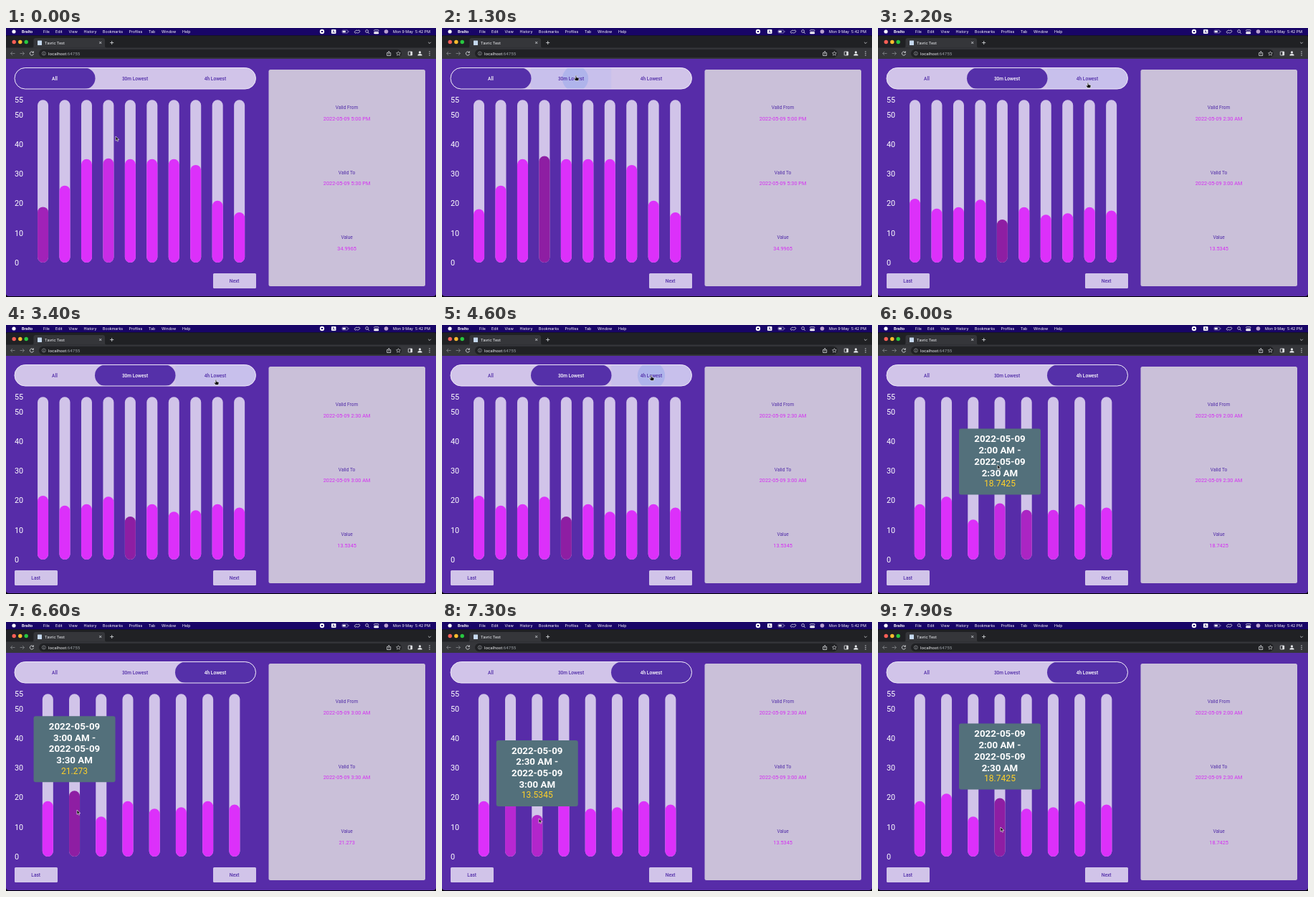
An HTML page that plays this animation: 600x375 px, repeating every 8000 ms.

```html
<!DOCTYPE html>
<html lang="en">
<head>
<meta charset="utf-8">
<title>Price chart</title>
<style>
  html, body { margin: 0; width: 100%; height: 100%; overflow: hidden; background: #000; }
  svg { display: block; width: 100vw; height: 100vh; }
  text { white-space: pre; }
  .menu { font: 5.3px Inter, sans-serif; fill: #fff; }
  .app { font-weight: 700; }
  .browser { font: 5.8px Roboto, sans-serif; fill: #e8eaed; }
  .line { fill: none; stroke: #dfe1e5; stroke-width: .8; }
  .axis { font: 10.8px Roboto, sans-serif; fill: #fff; }
  .tab, .button { font: 500 6.6px Roboto, sans-serif; fill: #512da8; text-anchor: middle; }
  .tab.on { fill: #fff; }
  .label { font: 6.6px Roboto, sans-serif; fill: #512da8; text-anchor: middle; }
  .value { font: 7.3px Roboto, sans-serif; fill: #d52df2; text-anchor: middle; }
  .tip { font: 700 13.3px Roboto, sans-serif; fill: #fff; text-anchor: middle; }
  .tip.price { font: 12.1px Roboto, sans-serif; fill: #ffd02a; }
</style>
</head>
<body>
<svg id="stage" viewBox="0 0 600 375" preserveAspectRatio="none">
  <defs>
    <clipPath id="pill"><rect x="12" y="55.5" width="336.5" height="29.5" rx="14.75"/></clipPath>
  </defs>
  <g id="shell"></g>
  <g id="live"></g>
</svg>
<script>
const LOOP = 8000, SWAP = 150;
const BASE = 327, TOP = 100.3, UNIT = 4.122;
const LEFT = 28.6, SPAN = 320, BAR = 15;
const PALE = '#d1c4e9', PURPLE = '#572ca8';
const PLAIN = [220, 48, 250], PICKED = [142, 30, 163];

const night = [21.588, 18.27, 18.7425, 21.273, 13.5345, 18.7425, 16.17, 16.695, 18.7425, 17.598];
const SETS = [
  { values: [18.06, 26.04, ...Array(5).fill(34.9965), 33.012, 20.937, 16.989], start: 1110 },
  { values: night, start: 270 },
  { values: night.slice(2), start: 210 }
];
const SWITCH = [[1400, 1, 4], [4700, 2, 0]];
const RIPPLES = [[1200, 186, 70.5], [4490, 292, 70.5]];

// time, x, y of the pointer tip
const PATH = [
  [0, 153, 151], [300, 153, 150], [700, 156, 96], [1100, 187, 66], [1600, 187, 66],
  [2050, 293, 76], [4200, 293, 76], [4450, 292, 70], [5400, 292, 70],
  [6400, 99, 262], [6900, 99, 262], [7700, 171, 286], [8000, 171, 286]
];

const mix = (a, b, p) => a + (b - a) * p;
const clamp = v => Math.max(0, Math.min(1, v));
const ease = p => p * p * (3 - 2 * p);
const rect = (x, y, w, h, fill, r = 0, extra = '') =>
  `<rect x="${x}" y="${y}" width="${w}" height="${h}" rx="${r}" fill="${fill}" ${extra}/>`;
const dot = (x, y, r, fill, extra = '') => `<circle cx="${x}" cy="${y}" r="${r}" fill="${fill}" ${extra}/>`;
const text = (cls, x, y, s) => `<text class="${cls}" x="${x}" y="${y}">${s}</text>`;
const line = (d, extra = '') => `<path class="line" d="${d}" ${extra}/>`;

function pointer(t) {
  const i = Math.max(1, PATH.findIndex(k => k[0] > t));
  const [a, b] = [PATH[i - 1], PATH[i]];
  const p = ease((t - a[0]) / (b[0] - a[0]));
  return [mix(a[1], b[1], p), mix(a[2], b[2], p)];
}

function centre(set, i) {
  const n = SETS[set].values.length;
  const gap = (SPAN - n * BAR) / (n + 1);
  return LEFT + gap + BAR / 2 + i * (gap + BAR);
}

function barUnder(set, [x, y]) {
  if (y < TOP || y > BASE) return -1;
  return SETS[set].values.findIndex((v, i) => Math.abs(x - centre(set, i)) < 9);
}

const setAt = t => SWITCH.reduce((s, [at, set]) => t >= at ? set : s, 0);

// Every change of selection, found by following the pointer
const events = [{ t: -1000, set: 0, pick: 0 }, { t: -35, set: 0, pick: 3 }];
for (let t = 0; t < LOOP; t += 10) {
  const set = setAt(t), last = events[events.length - 1];
  const hit = barUnder(set, pointer(t));
  const change = SWITCH.find(s => s[0] === t);
  if (change) events.push({ t, set, pick: change[2] });
  else if (hit >= 0 && hit !== last.pick) events.push({ t, set, pick: hit });
}

// Each bar as value and highlight, blended from the pose before it
function pose(k, t) {
  const { set, pick, t: at } = events[k];
  const goal = SETS[set].values.map((v, i) => ({ v: v + (i === pick), h: +(i === pick) }));
  const p = clamp((t - at) / SWAP);
  if (!k || p === 1) return goal;
  const from = pose(k - 1, at);
  return goal.map((g, i) => ({ v: mix(from[i].v, g.v, p), h: mix(from[i].h, g.h, p) }));
}

function clock(m) {
  const h = Math.floor(m / 60);
  return `${h % 12 || 12}:${String(m % 60).padStart(2, '0')} ${h < 12 ? 'AM' : 'PM'}`;
}

function drawShell() {
  const menu = [['Bralto', 22], ['File', 52], ['Edit', 69], ['View', 87.5], ['History', 108.5],
    ['Bookmarks', 135], ['Profiles', 171.5], ['Tab', 199], ['Window', 217], ['Help', 246]];
  const axis = [0, 10, 20, 30, 40, 50, 55];
  const grey = 'style="stroke:#85878b"';
  return [
    rect(0, 0, 600, 10.5, '#180567'),
    dot(11, 5, 2.6, '#fff'),
    ...menu.map(([s, x], i) => text(i ? 'menu' : 'menu app', x, 7, s)),
    dot(441, 5, 3.2, '#fff'), rect(439.9, 3.9, 2.2, 2.2, '#180567', .3),
    rect(454, 2, 6.5, 6, '#fff', 1), '<text x="455.5" y="7" font-family="Inter, sans-serif" font-size="5" fill="#180567">A</text>',
    rect(469, 3, 8, 4, 'none', 1, 'stroke="#aaa2d0" stroke-width=".6"'), rect(469.8, 3.8, 4, 2.4, '#fff', .4),
    rect(477.6, 4.2, .8, 1.6, '#aaa2d0'),
    line('M489 6.5l-1 .6a1.5 1.5 0 0 1-1.2-2.6l2-1.2a1.5 1.5 0 0 1 2 .7M491 3.6l1-.5a1.5 1.5 0 0 1 1.3 2.6l-2 1.2a1.5 1.5 0 0 1-2-.7'),
    dot(503.6, 4.5, 1.9, 'none', 'stroke="#fff" stroke-width=".7"'), line('M505 6l1.8 1.8'),
    rect(513.5, 2.5, 6.5, 2.2, 'none', 1.1, 'stroke="#fff" stroke-width=".6"'), rect(513.2, 5.6, 7, 2.6, '#fff', 1.3),
    dot(530.5, 5, 2.8, '#b9a0cf'),
    text('menu', 540, 7, 'Mon 9 May  5:42 PM'),

    rect(0, 10.5, 600, 20, '#202124', 2),
    dot(11.2, 19.5, 2.7, '#ff5f57'), dot(19.8, 19.5, 2.7, '#febc2e'), dot(28.2, 19.5, 2.7, '#28c840'),
    '<path d="M36 27.5q2.5 0 2.5-2.5v-8q0-3 3-3h93.500q3 0 3 3v8q0 2.500 2.500 2.500z" fill="#35363a"/>',
    rect(44, 17.5, 6, 6.5, '#c5d8ee', .5),
    text('browser', 54, 22.7, 'Tavric Test'),
    line('M130.200 19l3 3m0-3l-3 3'), line('M145.200 20.500h5M147.700 18v5'),
    line('M589.200 19.800l1.800 1.800l1.800-1.800'),
    rect(0, 27.5, 600, 15.5, '#35363a'),
    line('M12.500 35.500h-6m2.500-2.500l-2.500 2.500l2.500 2.500', grey), line('M19.500 35.500h6m-2.500-2.500l2.500 2.500l-2.500 2.500', grey),
    line('M38 33.900a2.600 2.600 0 1 0 .5 2.200M38.400 32.400v2h-2'),
    rect(46, 29.8, 506, 11.4, '#202124', 5.7),
    dot(52.8, 35.5, 2.5, 'none', 'stroke="#a5a8ad" stroke-width=".6"'), line('M52.800 35.200v1.700M52.800 33.700v.6', 'style="stroke:#a5a8ad"'),
    '<text class="browser" x="59" y="37.500" style="font-size:6.200px">localhost<tspan fill="#9aa0a6">:64755</tspan></text>',
    line('M533 34.500h-1.300v4h5v-4h-1.300M534.200 37v-4.500m-1.300 1.300l1.300-1.300l1.300 1.300'),
    line('M547.500 32.700l.9 1.900l2 .2l-1.500 1.400l.4 2l-1.800-1l-1.800 1l.4-2l-1.500-1.400l2-.2z', 'style="stroke-width:.6"'),
    rect(561.3, 33, 5.4, 5, 'none', .4, 'stroke="#e8eaed" stroke-width=".8"'), rect(564.4, 33, 2.3, 5, '#e8eaed'),
    dot(577.5, 33.9, 1.6, '#e8eaed'), '<path d="M574.500 38.500v-.8q0-1.700 3-1.700t3 1.700v.8z" fill="#e8eaed"/>',
    ...[33, 35.5, 38].map(y => dot(591, y, .65, '#dfe1e5')),

    `<path d="M0 43h600v327q0 4-4 4h-592q-4 0-4-4z" fill="${PURPLE}"/>`,
    rect(366.5, 58, 218.5, 302, '#cac0d9', 2.5),
    ...axis.map(n => text('axis', 12, BASE - n * UNIT + 3.9, n)),
    text('label', 475.6, 113, 'Valid From'), text('label', 475.6, 203.7, 'Valid To'), text('label', 475.6, 294.3, 'Value'),
    button(289, 'Next')
  ].join('');
}

function button(x, name) {
  return rect(x, 342, 60, 21, PALE, 1.5) + text('button', x + 29.7, 354.9, name);
}

function drawTabs(t, set, [x, y]) {
  const over = y > 55 && y < 85 ? Math.floor((x - 12) / 112) : -1;
  const out = [rect(12, 55.5, 336.5, 29.5, PALE, 14.75), '<g clip-path="url(#pill)">'];
  if (over >= 0 && over !== set) out.push(rect(12.3 + over * 112, 55, 112, 30.5, '#8ca8ff', 0, 'opacity=".14"'));
  out.push(rect(12 + set * 112, 55.5, 112.5, 29.5, '#5530a9', 14.75));
  for (const [at, cx, cy] of RIPPLES) {
    const age = t - at;
    if (age < 0 || age > 450) continue;
    out.push(dot(cx, cy, 8 + age * .1, '#7e9be8', `opacity="${.34 * clamp((450 - age) / 240)}"`));
  }
  out.push('</g>', rect(12, 55.5, 336.5, 29.5, 'none', 14.75, 'stroke="#eee8f8" stroke-width="1"'));
  ['All', '30m Lowest', '4h Lowest'].forEach((s, i) =>
    out.push(text(i === set ? 'tab on' : 'tab', 68 + i * 112, 72.8, s)));
  return out.join('');
}

function drawBars(bars, set) {
  return bars.map(({ v, h }, i) => {
    const x = centre(set, i) - BAR / 2;
    const fill = `rgb(${PLAIN.map((c, j) => Math.round(mix(c, PICKED[j], h)))})`;
    return rect(x, TOP, BAR, BASE - TOP, PALE, BAR / 2) +
      rect(x, BASE - v * UNIT, BAR, v * UNIT, fill, BAR / 2);
  }).join('');
}

function drawTip(x, barTop, from, to, price) {
  const y = barTop - 104;
  const rows = ['2022-05-09', `${from} -`, '2022-05-09', to];
  return rect(x - 57, y, 114, 92, '#53707b', 3) +
    rows.map((s, i) => text('tip', x, y + 18.8 + i * 15.7, s)).join('') +
    text('tip price', x, y + 80.4, price);
}

function drawPointer([x, y]) {
  const hand = y > 55 && y < 85;
  const d = hand
    ? 'M-.8 .6q.8-1 1.500 0v2.200l2.600.6q.9.300.7 1.300l-.6 2.900h-3.900l-2.300-3q.2-1 1.200-.5l.8.6z'
    : 'M0 0v6.300l1.500-1.400l1.100 2.300l1-.5l-1-2.200h2.100z';
  return `<path d="${d}" transform="translate(${x} ${y})" fill="#111" stroke="#fff" stroke-width=".6" stroke-linejoin="round"/>`;
}

const live = document.getElementById('live');
document.getElementById('shell').innerHTML = drawShell();

function draw(t) {
  let k = 0;
  while (k + 1 < events.length && events[k + 1].t <= t) k++;
  const { set, pick } = events[k];
  const { values, start } = SETS[set];
  const bars = pose(k, t), tip = pointer(t);
  const from = clock(start - 30 * pick), to = clock(start - 30 * pick + 30);
  const out = [
    drawTabs(t, set, tip), drawBars(bars, set),
    text('value', 475.6, 128.8, `2022-05-09 ${from}`),
    text('value', 475.6, 219.4, `2022-05-09 ${to}`),
    text('value', 475.6, 310, values[pick])
  ];
  if (set) out.push(button(12, 'Last'));
  if (barUnder(set, tip) === pick)
    out.push(drawTip(centre(set, pick), BASE - bars[pick].v * UNIT, from, to, values[pick]));
  out.push(drawPointer(tip));
  live.innerHTML = out.join('');
}

const begin = performance.now();
function tick() {
  draw((performance.now() - begin) % LOOP);
  requestAnimationFrame(tick);
}
tick();
</script>
</body>
</html>
```
